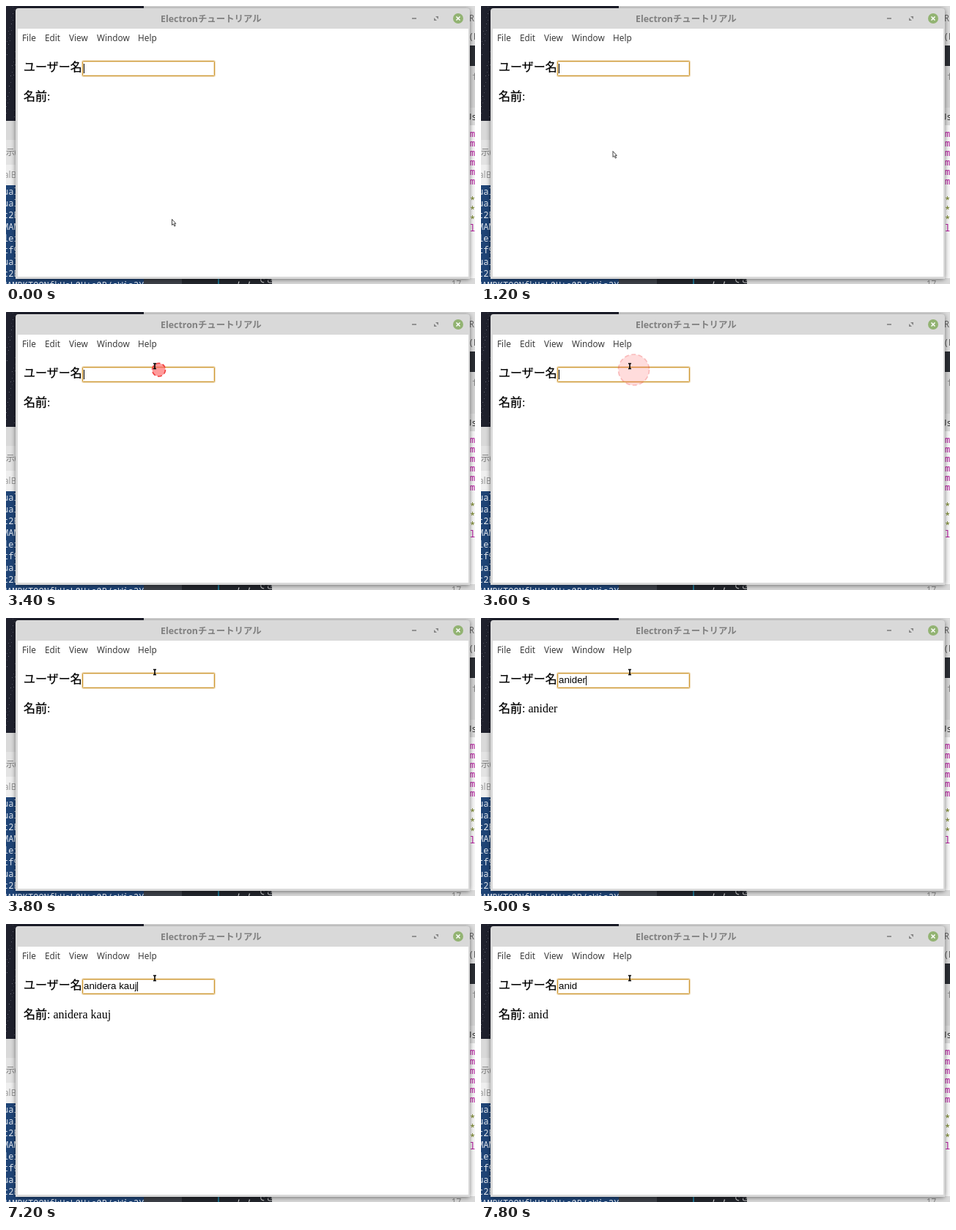
Animation of 640 by 380 pixels, one loop 8 s. Source, as an HTML page:

```html
<!DOCTYPE html>
<html lang="ja">
<head>
<meta charset="utf-8">
<title>Electronチュートリアル</title>
<style>
  html, body { margin: 0; width: 100%; height: 100%; overflow: hidden; background: #fff; }
  svg { display: block; width: 100vw; height: 100vh; }
  text { white-space: pre; }
  .ui { font: 11.8px "Noto Sans", "Noto Sans CJK JP", sans-serif; fill: #3c3c3c; }
  .title { font: bold 12.4px "Noto Sans", "Noto Sans CJK JP", sans-serif; fill: #808080; }
  .page { font: 16px "Liberation Serif", serif; }
  .label { font: 500 16px "Noto Sans CJK JP", "Noto Sans CJK", sans-serif; stroke: #000; stroke-width: .25; }
  .field { font: 13.333px "Liberation Sans", sans-serif; }
  .mono { font: 12px "Noto Sans Mono", "DejaVu Sans Mono", monospace; }
</style>
</head>
<body>
<svg viewBox="0 0 640 380">
  <defs>
    <filter id="blur" x="-5%" y="-5%" width="110%" height="110%"><feGaussianBlur stdDeviation="3"/></filter>
  </defs>

  <!-- windows behind -->
  <rect width="640" height="380" fill="#dcdcdc"/>
  <rect width="188" height="158" fill="#1f212d"/>
  <g id="stars" fill="#8d8d9c"></g>
  <rect y="157" width="188" height="26" fill="#d9d9d9"/>
  <rect y="183" width="188" height="34" fill="#e3e3e3"/>
  <rect y="217" width="188" height="28" fill="#efefef"/>
  <text class="ui" x="0" y="204" style="fill:#777">示(</text>
  <text class="ui" x="-3" y="235" style="fill:#999">alB</text>
  <rect y="245" width="188" height="135" fill="#1f4476"/>
  <g id="terminal" class="mono" fill="#e4e9f0"></g>
  <rect x="188" y="360" width="52" height="20" fill="#3d4148"/>
  <rect x="240" y="360" width="123" height="20" fill="#23262c"/>
  <rect x="289" y="360" width="2" height="20" fill="#1f6f8a"/>
  <text class="mono" x="314" y="378" fill="#d8d8d8">; ; でき</text>
  <rect x="363" y="360" width="277" height="20" fill="#d9d9d9"/>
  <text class="ui" x="604" y="384" style="fill:#888">-17</text>
  <g id="editor" class="mono">
    <rect x="630" y="54" width="10" height="28" fill="#2a2d33"/>
    <rect x="630" y="83" width="10" height="56" fill="#d2d2d2"/>
    <rect x="630" y="163" width="10" height="209" fill="#f7f7f7"/>
    <text x="632" y="21" fill="#666">R</text>
    <text x="631" y="46" fill="#555">(H</text>
    <text x="636" y="101" fill="#888">f</text>
    <text x="628" y="156" fill="#333">Us</text>
  </g>

  <!-- application window -->
  <rect x="13" y="4" width="620" height="370" rx="4" filter="url(#blur)" opacity=".5"/>
  <path d="M13 373V7q0-4 4-4h612q4 0 4 4v366z" fill="#d9d9d9"/>
  <rect x="16" y="31" width="615" height="339" fill="#fff"/>
  <text class="title" x="211" y="22">Electronチュートリアル</text>
  <path d="M554 17h6" stroke="#7b7b7b" stroke-width="1.5"/>
  <path d="M586 14h4v4zM584 16v4h4z" fill="#858585"/>
  <circle cx="617" cy="17" r="7" fill="#92b372"/>
  <path d="M614.5 14.5l5 5m0-5l-5 5" stroke="#fff" stroke-width="1.5"/>
  <g class="ui">
    <text x="22" y="48">File</text>
    <text x="53" y="48">Edit</text>
    <text x="86" y="48">View</text>
    <text x="124" y="48">Window</text>
    <text x="180" y="48">Help</text>
  </g>

  <!-- page -->
  <text class="label" x="24" y="89">ユーザー名</text>
  <g fill="none" stroke="#cf9a35">
    <rect x="104.5" y="75.5" width="180" height="20" rx="1" stroke-width="3" opacity=".3"/>
    <rect x="104.5" y="75.5" width="180" height="20" rx="1"/>
  </g>
  <text id="input" class="field" x="106" y="89"></text>
  <rect id="caret" y="79" width="1" height="13"/>
  <text class="label" x="24" y="129">名前</text>
  <text id="output" class="page" x="56" y="129"></text>

  <circle id="ripple" cx="208.5" cy="79" fill="#ff6666" fill-opacity=".65"
          stroke="#f04040" stroke-width="1.7" stroke-dasharray="6 3.5"/>
  <path id="arrow" d="M.5 .5v8l1.8-1.6 1.6 3.2 1.3-.7-1.5-3h2.1z" fill="#fff" stroke="#333" stroke-width=".9"/>
  <path id="beam" d="M-2-3.5h4M0-3.5v7M-2 3.5h4" fill="none" stroke="#000" stroke-width="1.6"/>
</svg>
<script>
const el = id => document.getElementById(id);
const LOOP = 8000, STEP = 200;
const NAME = 'anidera kauji';

// [time, value] pairs; each value holds until the next time
const TYPED = [[0, 0], [4200, 1], [4600, 2], [4800, 4], [5000, 6], [5200, 7], [5400, 8], [5600, 9],
  [5800, 10], [6000, 11], [6200, 13], [7200, 12], [7600, 10], [7800, 4]];
const CARET_TOGGLES = [600, 1200, 1800, 2200, 2800, 3200, 3800, 4200, 6600, 7200, 7800];
const POINTER = [{ x: 226, y: 291 }, { x: 179.5, y: 198 }, { x: 203, y: 74 }];

const valueAt = (steps, t) => steps.findLast(([time]) => time <= t)[1];
const ease = (t, start, duration) => {
  const p = Math.min(1, Math.max(0, (t - start) / duration));
  return p * p * (3 - 2 * p);
};

function add(parent, tag, attributes, content = '') {
  const node = document.createElementNS('http://www.w3.org/2000/svg', tag);
  for (const [key, value] of Object.entries(attributes)) node.setAttribute(key, value);
  node.textContent = content;
  el(parent).append(node);
}

function buildBackdrop() {
  ['ual', 'ual', 'c2B', 'MAM', 'lei', 'tf9', 'ual', 'c2B', 'MAMRKTOQNfkHoL0U+o0B/sWia3Y']
    .forEach((line, i) => add('terminal', 'text', { x: i === 8 ? -6 : -4, y: 258 + i * 16 }, line));
  for (let i = 0; i < 6; i++) add('editor', 'text', { x: 633, y: 179 + i * 13, fill: '#b3149c' }, 'm');
  for (let i = 0; i < 3; i++) add('editor', 'text', { x: 633, y: 270 + i * 13, fill: '#6f7d1c' }, '*');
  add('editor', 'text', { x: 633, y: 308, fill: '#b3149c' }, 'l');
  for (let i = 0; i < 40; i++) {
    add('stars', 'rect', { x: i * 5 % 13, y: i * 47 % 155, width: 1, height: 1, opacity: .25 + i % 3 * .2 });
  }
}

function drawPointer(t) {
  const first = ease(t, 400, 400), second = ease(t, 2400, 800);
  const along = axis => POINTER[0][axis]
    + (POINTER[1][axis] - POINTER[0][axis]) * first
    + (POINTER[2][axis] - POINTER[1][axis]) * second;
  const x = along('x'), y = along('y'), overField = y < 96;
  for (const id of ['arrow', 'beam']) {
    el(id).setAttribute('transform', `translate(${x} ${y})`);
    el(id).style.display = (id === 'beam') === overField ? '' : 'none';
  }
  const age = (t - 3400) / STEP;
  el('ripple').style.display = age >= 0 && age < 2 ? '' : 'none';
  el('ripple').setAttribute('r', 9 + 12 * Math.max(0, age));
  el('ripple').setAttribute('opacity', 1 - .65 * age);
}

function draw(t) {
  const text = NAME.slice(0, valueAt(TYPED, t));
  el('input').textContent = text;
  el('output').textContent = ': ' + text;
  const width = text ? el('input').getComputedTextLength() : 0;
  el('caret').setAttribute('x', Math.round(106 + width));
  const toggles = CARET_TOGGLES.filter(time => time <= t).length;
  el('caret').style.display = toggles % 2 ? 'none' : '';
  drawPointer(t);
}

function frame() {
  draw(Math.floor(performance.now() % LOOP / STEP) * STEP);
  requestAnimationFrame(frame);
}

buildBackdrop();
frame();
</script>
</body>
</html>
```
